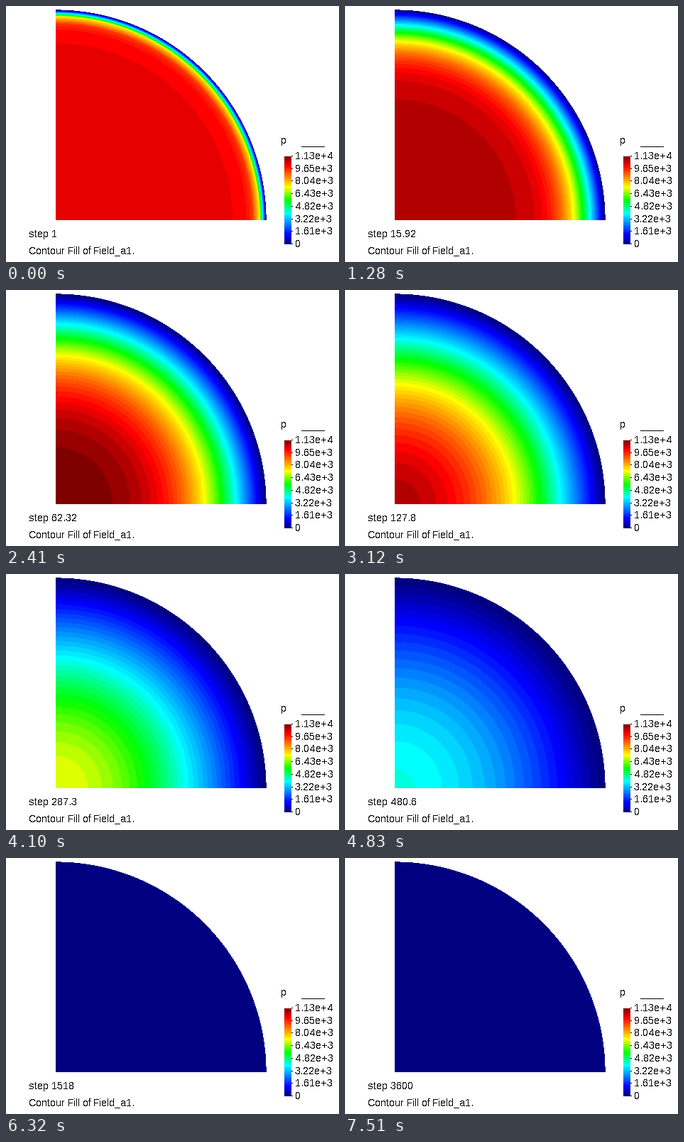
A matplotlib script for the animation above (7980 ms loop, 469 px wide and 361 px high).

```python
import numpy as np
import matplotlib.pyplot as plt
from matplotlib.animation import FuncAnimation

W, H, DPI = 469, 361, 64
LOOP, TICK = 7980, 20
LEVELS = 50

plt.rcParams.update({
    "font.family": "Liberation Sans",
    "font.size": 14 * 72 / DPI,
    "text.antialiased": False,
    "text.hinting_factor": 1,
})

# Time steps grow by 5 % each, up to the end time.
STEPS = 107
times = np.minimum(20 * (1.05 ** np.arange(STEPS + 1) - 1), 3600)


def radial_elements(r):
    """Mass and stiffness matrices of linear elements on a disc."""
    mass = np.zeros((r.size, r.size))
    stiff = np.zeros_like(mass)
    for i, (a, b) in enumerate(zip(r[:-1], r[1:])):
        h, s = b - a, slice(i, i + 2)
        mass[s, s] += h / 12 * np.array([[3 * a + b, a + b],
                                         [a + b, a + 3 * b]])
        stiff[s, s] += (a + b) / (2 * h) * np.array([[1, -1], [-1, 1]])
    return mass, stiff


def consolidate(elements=30, kappa=2 / 7, c=6.73e-4):
    """Pore pressure in a loaded, draining cylinder (implicit Euler)."""
    r = np.linspace(0, 1, elements + 1)
    mass, stiff = radial_elements(r)

    # g = p + f; the constant load ties the rim value f to the mean of g
    load_row = -2 * kappa * mass.sum(axis=0)
    load_row[-1] += 1
    g = np.zeros(r.size)
    history = []
    for dt in np.diff(times):
        system = mass + dt * c * stiff
        rhs = mass @ g
        system[-1], rhs[-1] = load_row, -1
        g = np.linalg.solve(system, rhs)
        history.append(g - g[-1])
    return r, np.array(history)


radii, pressure = consolidate()
pressure /= pressure.max()

# Blue to red ramp with darkened ends, in discrete bands
stops = [0, 5, 17, 24.5, 32, 44, 49]
ramp = np.array([(0, 0, .5), (0, 0, 1), (0, 1, 1), (0, 1, 0),
                 (1, 1, 0), (1, 0, 0), (.5, 0, 0)])
band = np.arange(LEVELS)
palette = np.stack([np.interp(band, stops, ch) for ch in ramp.T], axis=1)
palette = np.round(palette * 255).astype(np.uint8)

# Quarter disc
CX, CY, R = 70, 302, 296.6
yy, xx = np.mgrid[0:H, 0:W] + 0.5
dist = np.hypot(xx - CX, yy - CY) / R
disc = (dist <= 1) & (xx > CX) & (yy < CY)
disc_r = dist[disc]

# Static parts: colour bar, ticks, rule
canvas = np.full((H, W, 3), 255, np.uint8)
BAR_TOP, BAR_END = 212, 336
rows = np.arange(BAR_TOP, BAR_END)
level = ((BAR_END - rows - 0.5) / (BAR_END - BAR_TOP) * LEVELS).astype(int)
canvas[BAR_TOP:BAR_END, 392:402] = palette[level][:, None]
canvas[198, 416:449] = 0
label_y = np.linspace(211.5, 335.5, 8)
for y in label_y:
    canvas[int(y), 402:404] = 0

fig = plt.figure(figsize=(W / DPI, H / DPI), dpi=DPI, facecolor="white")
ax = fig.add_axes([0, 0, 1, 1])
ax.axis("off")
image = ax.imshow(canvas, extent=(0, W, H, 0), interpolation="nearest",
                  aspect="auto")
ax.set_xlim(0, W)
ax.set_ylim(H, 0)


def label(x, y, text):
    return ax.text(x, y, text, color="black", ha="left", va="baseline")


step_label = label(32, 326, "step 1")
label(32, 349, "Contour Fill of Field_a1.")
label(387, 194, "p")
names = ["1.13e+4", "9.65e+3", "8.04e+3", "6.43e+3",
         "4.82e+3", "3.22e+3", "1.61e+3", "0"]
for y, name in zip(label_y, names):
    label(407, int(y) + 5, name)

KEY_MS = [610, 1280, 2410, 3120, 4100, 5580, 7510]
KEY_STEP = [2, 12, 29, 41, 56, 78, 107]


def step_at(ms):
    return int(np.interp(ms, KEY_MS, KEY_STEP, left=1) + 1e-6)


def update(i):
    n = step_at(i * TICK + TICK / 2)
    p = np.interp(disc_r, radii, pressure[n - 1])
    bands = np.clip((p * LEVELS).astype(int), 0, LEVELS - 1)
    picture = canvas.copy()
    picture[disc] = palette[bands]
    image.set_data(picture)
    step_label.set_text(f"step {times[n]:.4g}")
    return image, step_label


anim = FuncAnimation(fig, update, frames=LOOP // TICK, interval=TICK,
                     repeat=True, repeat_delay=0, blit=False)
plt.show()
```
